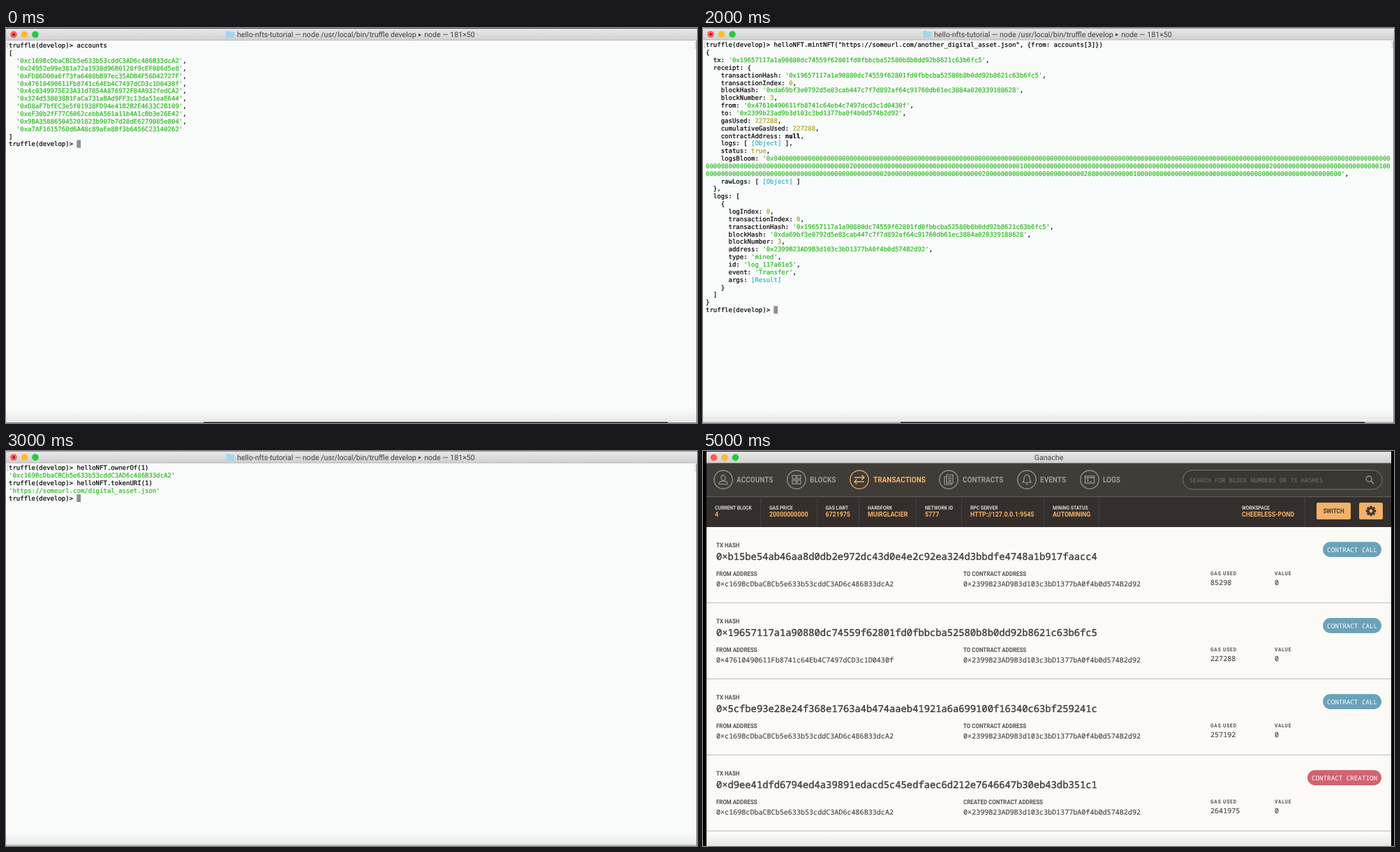
An HTML page with a canvas that plays this animation: 990x566 px, repeating every 6 s.

```html
<!DOCTYPE html>
<html lang="en">
<head>
<meta charset="utf-8">
<title>NFT tutorial session</title>
<style>
html, body { margin: 0; width: 100%; height: 100%; overflow: hidden; background: #000; }
canvas { display: block; width: 990px; height: 566px; }
</style>
</head>
<body>
<canvas id="stage" width="990" height="566"></canvas>
<script>
const ctx = document.getElementById('stage').getContext('2d');
const W = 990, H = 566, HOLD = 1000;
const CELL = 5.418, LINE = 10.855, LEFT = 4, COLS = 181;
const MONO = '"DejaVu Sans Mono", monospace';
const CODE = '"Noto Sans Mono", monospace';
const SANS = 'Roboto, sans-serif';
const CONDENSED = 0.88;
const GREEN = '#2ab91f', YELLOW = '#a99f1e', CYAN = '#2fb0c8';
const GRAY = '#a09b95', ORANGE = '#f3b168', INK = '#3f3a37', SOFT = '#57524e';

// ---------- helpers ----------
function box(x, y, w, h, fill) {
  ctx.fillStyle = fill;
  ctx.fillRect(x, y, w, h);
}

function round(x, y, w, h, r, fill, stroke) {
  ctx.beginPath();
  ctx.roundRect(x, y, w, h, r);
  if (fill) { ctx.fillStyle = fill; ctx.fill(); }
  if (stroke) { ctx.strokeStyle = stroke; ctx.stroke(); }
}

function disc(x, y, r, fill) {
  ctx.beginPath();
  ctx.arc(x, y, r, 0, 7);
  ctx.fillStyle = fill;
  ctx.fill();
}

function path(color, width, ...lines) {
  ctx.strokeStyle = color;
  ctx.lineWidth = width;
  ctx.beginPath();
  for (const pts of lines) {
    ctx.moveTo(pts[0], pts[1]);
    for (let i = 2; i < pts.length; i += 2) ctx.lineTo(pts[i], pts[i + 1]);
  }
  ctx.stroke();
}

function fade(y0, y1, from, to) {
  const g = ctx.createLinearGradient(0, y0, 0, y1);
  g.addColorStop(0, from);
  g.addColorStop(1, to);
  return g;
}

// Text placed by the vertical centre of its capitals; heft thickens the strokes.
function label(str, x, mid, font, size, color, align = 'left', heft = 0) {
  ctx.save();
  ctx.transform(1, 1e-5, 0, 1, 0, 0); // invisible skew, keeps fractional baselines
  ctx.font = font.replace('$', size + 'px');
  ctx.textAlign = align;
  ctx.fillStyle = ctx.strokeStyle = color;
  ctx.fillText(str, x, mid + size * 0.36);
  if (heft) {
    ctx.lineWidth = heft;
    ctx.strokeText(str, x, mid + size * 0.36);
  }
  ctx.restore();
}

const sans = (s, x, y, align) => label(s, x, y, '$ ' + SANS, 10.64, '#403f40', align);
const code = (s, x, y, size, color, heft) =>
  label(s, x, y, '$ ' + CODE, size, color, 'left', heft);

function condensed(str, x, mid, size, color, spacing = 0, align = 'left') {
  ctx.save();
  ctx.translate(x, 0);
  ctx.scale(CONDENSED, 1);
  ctx.letterSpacing = spacing + 'px';
  label(str, 0, mid, 'bold $ ' + SANS, size, color, align);
  ctx.restore();
}

function titleBar(x, w, top, bottom) {
  box(x, top, w, bottom - top, fade(top, bottom, '#e8e8e8', '#d0d0d0'));
  box(x, bottom - 0.6, w, 0.8, '#b0b0b0');
}

function lights(x, y) {
  ['#fc5b57', '#fdbc2e', '#28c840'].forEach((c, i) => disc(x + i * 15.5, y, 4.8, c));
}

// ---------- terminal content ----------
const PROMPT = 'truffle(develop)> ';
const CONTRACT = '0x2399B23AD9B3d103c3bD1377bA0f4b0d574B2d92';
const ACCOUNTS = [
  '0xc169BcDbaCBCb5e633b53cddC3AD6c486B33dcA2',
  '0x24952e99e381a72a1938d96B0128f9cEF086d5e8',
  '0xFD86D00a6f73fa6408bB97ec35ADB4F56D42727F',
  '0x47610490611Fb8741c64Eb4C7497dCD3c1D0430f',
  '0x4c0349975E23A31d7854A876972F84A932fedCA2',
  '0x324d538038B1FaCa731aBAd9FF3c13da51eaE644',
  '0xD8aF7bfEC3e5f01938FD94e41B2B2E4633C2B109',
  '0xeF30b2fF77C6062cebbA561a11b4A1cBb3e26E42',
  '0x9BA358865045201823b907b7d28dE6279085e804',
  '0xa7AF1615760d6A48c89aEe8Bf3b6456C23140262'
];
const MINT_1 = {
  tx: '0x5cfbe93e28e24f368e1763a4b474aaeb41921a6a699100f16340c63bf259241c',
  block: '0x080b8945e6d0e9faedeed1db7b6fca70cacd3e678e67258269df29a1c0ee76c7',
  number: 2, from: ACCOUNTS[0], gas: 257192,
  bloom: [{ 141: 4, 169: 8 }, { 8: 4, 13: 8, 18: 4, 38: 2, 58: 8, 83: 1 },
    { 42: 1, 47: 2, 73: 2, 100: 6, 102: 8, 130: 2 }],
  events: [['log_dd50d8d0', 'Transfer']]
};
const MINT_2 = {
  tx: '0x19657117a1a90880dc74559f62801fd0fbbcba52580b8b0dd92b8621c63b6fc5',
  block: '0xda69bf3e0792d5e83cab447c7f7d892af64c91760db61ec3884a020339188628',
  number: 3, from: ACCOUNTS[3], gas: 227288,
  bloom: [{ 19: 4, 169: 8 }, { 5: 8, 13: 8, 38: 2, 83: 1, 149: 2, 178: 1 },
    { 47: 2, 73: 2, 100: 2, 102: 8, 113: 1, 146: 8 }],
  events: [['log_117a61e5', 'Transfer']]
};
const TRANSFER = {
  tx: '0xb15be54ab46aa8d0db2e972dc43d0e4e2c92ea324d3bbdfe4748a1b917faacc4',
  block: '0x9e54f3525b7eb34b986126619fc7315ff0dc8950ce837f12820539e0140ad477',
  number: 4, from: ACCOUNTS[0], gas: 85298,
  bloom: [{ 85: 4, 140: 2, 141: 4, 169: 8 },
    { 8: 4, 13: 8, 18: 8, 19: 4, 38: 2, 43: 4, 58: 8, 83: 1, 158: 2 },
    { 42: 1, 47: 2, 73: 2, 100: 6, 102: 8, 107: 1, 130: 2 }],
  events: [['log_f0f245d3', 'Approval'], ['log_1ec879f9', 'Transfer']]
};

function bloomLine(head, digits, end) {
  const chars = [...head.padEnd(end, '0')];
  for (const col in digits) chars[col] = digits[col];
  return chars.join('');
}

function receipt(r) {
  const q = s => `'${s}'`;
  const objects = '[ ' + r.events.map(() => '[Object]').join(', ') + ' ]';
  const out = [
    '{',
    `  tx: ${q(r.tx)},`,
    '  receipt: {',
    `    transactionHash: ${q(r.tx)},`,
    '    transactionIndex: 0,',
    `    blockHash: ${q(r.block)},`,
    `    blockNumber: ${r.number},`,
    `    from: ${q(r.from.toLowerCase())},`,
    `    to: ${q(CONTRACT.toLowerCase())},`,
    `    gasUsed: ${r.gas},`,
    `    cumulativeGasUsed: ${r.gas},`,
    '    contractAddress: null,',
    `    logs: ${objects},`,
    '    status: true,',
    bloomLine("    logsBloom: '0x", r.bloom[0], COLS),
    bloomLine('', r.bloom[1], COLS),
    bloomLine('', r.bloom[2], 168) + "',",
    `    rawLogs: ${objects}`,
    '  },',
    '  logs: ['
  ];
  r.events.forEach(([id, event], i) => out.push(
    '    {',
    `      logIndex: ${i},`,
    '      transactionIndex: 0,',
    `      transactionHash: ${q(r.tx)},`,
    `      blockHash: ${q(r.block)},`,
    `      blockNumber: ${r.number},`,
    `      address: ${q(CONTRACT)},`,
    "      type: 'mined',",
    `      id: ${q(id)},`,
    `      event: ${q(event)},`,
    '      args: [Result]',
    i < r.events.length - 1 ? '    },' : '    }'
  ));
  return out.concat('  ]', '}');
}

// shift: vertical offset of the window, top: centre of the first text line
const SESSIONS = [
  { shift: 0, top: 25, dock: true, lines: [
    PROMPT + 'accounts', '[',
    ...ACCOUNTS.map((a, i) => `  '${a}'${i < 9 ? ',' : ''}`), ']'] },
  { shift: 1, top: 25.9, bare: true, lines: [
    PROMPT + 'const helloNFT = await HelloNFTContract.deployed();', 'undefined',
    PROMPT + 'helloNFT.mintNFT("https://someurl.com/digital_asset.json")',
    ...receipt(MINT_1)] },
  { shift: -0.4, top: 24, dock: true, lines: [
    PROMPT + 'helloNFT.mintNFT("https://someurl.com/another_digital_asset.json", {from: accounts[3]})',
    ...receipt(MINT_2)] },
  { shift: -0.4, top: 24.2, lines: [
    PROMPT + 'helloNFT.ownerOf(1)', `'${ACCOUNTS[0]}'`,
    PROMPT + 'helloNFT.tokenURI(1)', "'https://someurl.com/digital_asset.json'"] },
  { shift: 0.6, top: 24.8, lines: [
    PROMPT + `helloNFT.transferFrom("${ACCOUNTS[0]}", "${ACCOUNTS[1]}", 1)`,
    ...receipt(TRANSFER)] }
];

// ---------- terminal drawing ----------
const TOKEN = /^\d+'?|'[^']*'?|\[(?:Object|Result)\]|\b(?:true|\d+)(?=,)|null|undefined/g;

function tokenColor(t) {
  if (t === 'null') return '#000';
  if (t === 'undefined') return '#8c8c8c';
  if (t[0] === '[') return CYAN;
  return t[0] === "'" || t.length > 100 ? GREEN : YELLOW;
}

function run(str, col, mid, color) {
  const weight = str === 'null' ? 'bold ' : '';
  label(str, LEFT + col * CELL, mid, weight + '$ ' + MONO, 9, color, 'left', 0.2);
}

function termLine(str, mid) {
  if (str.startsWith(PROMPT)) return run(str, 0, mid, '#000');
  let at = 0;
  for (const m of str.matchAll(TOKEN)) {
    if (m.index > at) run(str.slice(at, m.index), at, mid, '#000');
    run(m[0], m.index, mid, tokenColor(m[0]));
    at = m.index + m[0].length;
  }
  if (at < str.length) run(str.slice(at), at, mid, '#000');
}

const bracket = (x, y, dir) =>
  path('#b4b6b5', 0.8, [x + dir * 2, y - 4, x, y - 4, x, y + 4, x + dir * 2, y + 4]);

function windowTitle(mid) {
  round(315.5, mid - 4.6, 5, 3, 0.8, '#8cc6e4');
  round(315.5, mid - 3.6, 12, 8.4, 0.8, '#a5d5ed');
  sans('hello-nfts-tutorial — node /usr/local/bin/truffle develop', 331, mid + 0.2);
  sans('node — 181×50', 671.8, mid + 0.2, 'right');
  ctx.beginPath();
  ctx.moveTo(591, mid - 1.6);
  ctx.lineTo(595, mid + 0.6);
  ctx.lineTo(591, mid + 2.8);
  ctx.fillStyle = '#403f40';
  ctx.fill();
}

function terminal({ shift, top, lines, dock, bare }) {
  const mid = 9.4 + shift;
  box(0, 0, W, H, '#f9fbfa');
  box(0, 548, W, 18, fade(548, 566, 'rgba(225,226,226,0)', '#e6e7e7'));
  box(0, 0, W, 2, '#1c1c1c');
  titleBar(0, W, 0.8 + shift, 17.6 + shift);
  lights(11, mid);
  disc(11, mid, 1.6, '#7c0f0c');
  windowTitle(mid);

  if (!bare) bracket(2, top, 1);
  bracket(988, top, -1);
  lines.forEach((s, i) => termLine(s, top + i * LINE));
  const end = top + lines.length * LINE;
  run(PROMPT, 0, end, '#000');
  box(101.3, end - 5.5, 5.8, 11, '#8f8f8f');

  box(989, 18, 1, H, '#7b7c7c');
  box(0, 565 + shift, W, 1, '#8f9090');
  if (dock) box(283, 564.6, 665, 1.4, '#111');
}

// ---------- block explorer ----------
const ICONS = [
  () => {
    ctx.beginPath();
    ctx.ellipse(0, -2.5, 3, 3.8, 0, 0, 7);
    ctx.stroke();
    ctx.beginPath();
    ctx.moveTo(-6, 6.5);
    ctx.bezierCurveTo(-6, 1.5, -3, 2.5, 0, 2.5);
    ctx.bezierCurveTo(3, 2.5, 6, 1.5, 6, 6.5);
    ctx.closePath();
    ctx.stroke();
  },
  () => [-6, 1].forEach(x => [-6, 1].forEach(y => ctx.strokeRect(x, y, 5, 5))),
  c => path(c, 1.3, [-7, -3, 7, -3], [3.5, -6.5, 7, -3, 3.5, 0.5],
    [7, 3, -7, 3], [-3.5, -0.5, -7, 3, -3.5, 6.5]),
  c => path(c, 1.2, [-3, -7, 6, -7, 6, 5, -3, 5, -3, -7], [-3, -4, -6, -4, -6, 7, 4, 7, 4, 5],
    [-1, -4, 4, -4], [-1, -1.5, 4, -1.5], [-1, 1, 4, 1], [-1, 3, 4, 3]),
  c => {
    ctx.beginPath();
    ctx.moveTo(-6, 4);
    ctx.quadraticCurveTo(-4, 2, -4, -2);
    ctx.bezierCurveTo(-4, -8, 4, -8, 4, -2);
    ctx.quadraticCurveTo(4, 2, 6, 4);
    ctx.closePath();
    ctx.stroke();
    path(c, 1.3, [-1.5, 6.5, 1.5, 6.5], [0, -6.5, 0, -8]);
  },
  c => {
    ctx.strokeRect(-6.5, -5, 13, 10);
    path(c, 1.1, [-6.5, -2.6, 6.5, -2.6], [-4, -0.8, -2, 1, -4, 2.8], [-0.5, 3, 3, 3]);
  }
];

const NAV = [['ACCOUNTS', 29, 48], ['BLOCKS', 134, 153], ['TRANSACTIONS', 224, 244],
  ['CONTRACTS', 352, 372], ['EVENTS', 464, 483], ['LOGS', 554, 573]];
const STATS = [
  ['CURRENT BLOCK', '4', 17, 82], ['GAS PRICE', '20000000000', 95, 163],
  ['GAS LIMIT', '6721975', 175.5, 223], ['HARDFORK', 'MUIRGLACIER', 236, 305],
  ['NETWORK ID', '5777', 318, 370], ['RPC SERVER', 'HTTP://127.0.0.1:9545', 383, 488],
  ['MINING STATUS', 'AUTOMINING', 501, 567], ['WORKSPACE', 'CHEERLESS-POND', 772, 862]
];
const ROWS = [
  [TRANSFER.tx, ACCOUNTS[0], '85298'],
  [MINT_2.tx, ACCOUNTS[3], '227288'],
  [MINT_1.tx, ACCOUNTS[0], '257192'],
  ['0xd9ee41dfd6794ed4a39891edacd5c45edfaec6d212e7646647b30eb43db351c1', ACCOUNTS[0], '2641975', true]
];

function gear(x, y) {
  ctx.save();
  ctx.translate(x, y);
  for (let i = 0; i < 8; i++) {
    ctx.rotate(Math.PI / 4);
    box(-1.7, -7.2, 3.4, 4, INK);
  }
  ctx.restore();
  disc(x, y, 5.6, INK);
  disc(x, y, 2.4, ORANGE);
}

function txRow([hash, from, gas, created], i) {
  const y = i * 109;
  const hex = s => s.replace('0x', '0×');
  const field = (name, value, x) => {
    condensed(name, x, y + 175.6, 9, SOFT);
    code(hex(value), x, y + 190, 10.08, INK, 0.1);
  };
  const figure = (name, value, x) => {
    condensed(name, x, y + 175.6, 7.6, SOFT, 0.9);
    code(value, x, y + 188.6, 10.08, INK, 0.1);
  };
  condensed('TX HASH', 19, y + 135, 9, SOFT);
  code(hex(hash), 19, y + 151.2, 13.79, INK, 0.4);
  field('FROM ADDRESS', from, 19);
  field(created ? 'CREATED CONTRACT ADDRESS' : 'TO CONTRACT ADDRESS', CONTRACT, 373);
  figure('GAS USED', gas, 727);
  figure('VALUE', '0', 819);

  const badge = created ? 'CONTRACT CREATION' : 'CONTRACT CALL';
  const w = badge.length * 5.53 + 12;
  round(972 - w, y + 130.3, w, 21.6, 10.8, created ? '#d3626f' : '#6ba2b9');
  code(badge, 978 - w, y + 141.2, 9.22, '#fff');
  box(5, y + 217, 981, 1, '#bdbbb6');
}

function explorer() {
  box(0, 0, W, H, '#000');
  box(5, 17, 981, H, '#fbfaf6');
  titleBar(5, 981, 0.8, 17.4);
  lights(15.5, 9.3);
  sans('Ganache', 495.5, 9.6, 'center');

  box(5, 17.4, 981, 48, '#403c38');
  NAV.forEach(([name, cx, x], i) => {
    const color = i === 2 ? ORANGE : GRAY;
    ctx.save();
    ctx.translate(cx, 41);
    ctx.strokeStyle = color;
    ctx.lineWidth = 1.2;
    ctx.beginPath();
    ctx.arc(0, 0, 13.2, 0, 7);
    ctx.stroke();
    ICONS[i](color);
    ctx.restore();
    condensed(name, x, 41, 11.4, color);
  });
  ctx.lineWidth = 1;
  round(687.5, 27.5, 285.5, 27.5, 13.7, '#3a3632', '#7d7873');
  code('SEARCH FOR BLOCK NUMBERS OR TX HASHES', 697, 41.4, 8.6, '#7b756f');
  ctx.beginPath();
  ctx.arc(954, 40, 4, 0, 7);
  ctx.strokeStyle = GRAY;
  ctx.lineWidth = 1.3;
  ctx.stroke();
  path(GRAY, 1.5, [957, 43, 961, 47]);

  box(5, 65.4, 981, 43.6, '#342f2c');
  for (const [name, value, x, edge] of STATS) {
    condensed(name, x, 81, 7.7, '#d9d4ce');
    condensed(value, x, 90.4, 10, ORANGE);
    box(edge, 65.4, 1, 43.6, '#443f3b');
  }
  round(879, 74, 49, 24, 2, ORANGE);
  condensed('SWITCH', 903.5, 86, 9.2, INK, 0, 'center');
  round(940, 74, 34, 24, 2, ORANGE);
  gear(957, 86);

  ROWS.forEach(txRow);
  box(5, 550, 981, 16, fade(550, 566, 'rgba(228,227,224,0)', '#e6e5e2'));
}

// ---------- playback ----------
const SCENES = [...SESSIONS.map(s => () => terminal(s)), explorer];
const start = performance.now();
let shown = -1;

function tick() {
  const scene = Math.floor((performance.now() - start) / HOLD) % SCENES.length;
  if (scene !== shown) {
    ctx.textRendering = 'geometricPrecision';
    SCENES[scene]();
    shown = scene;
  }
  requestAnimationFrame(tick);
}
tick();
</script>
</body>
</html>
```
